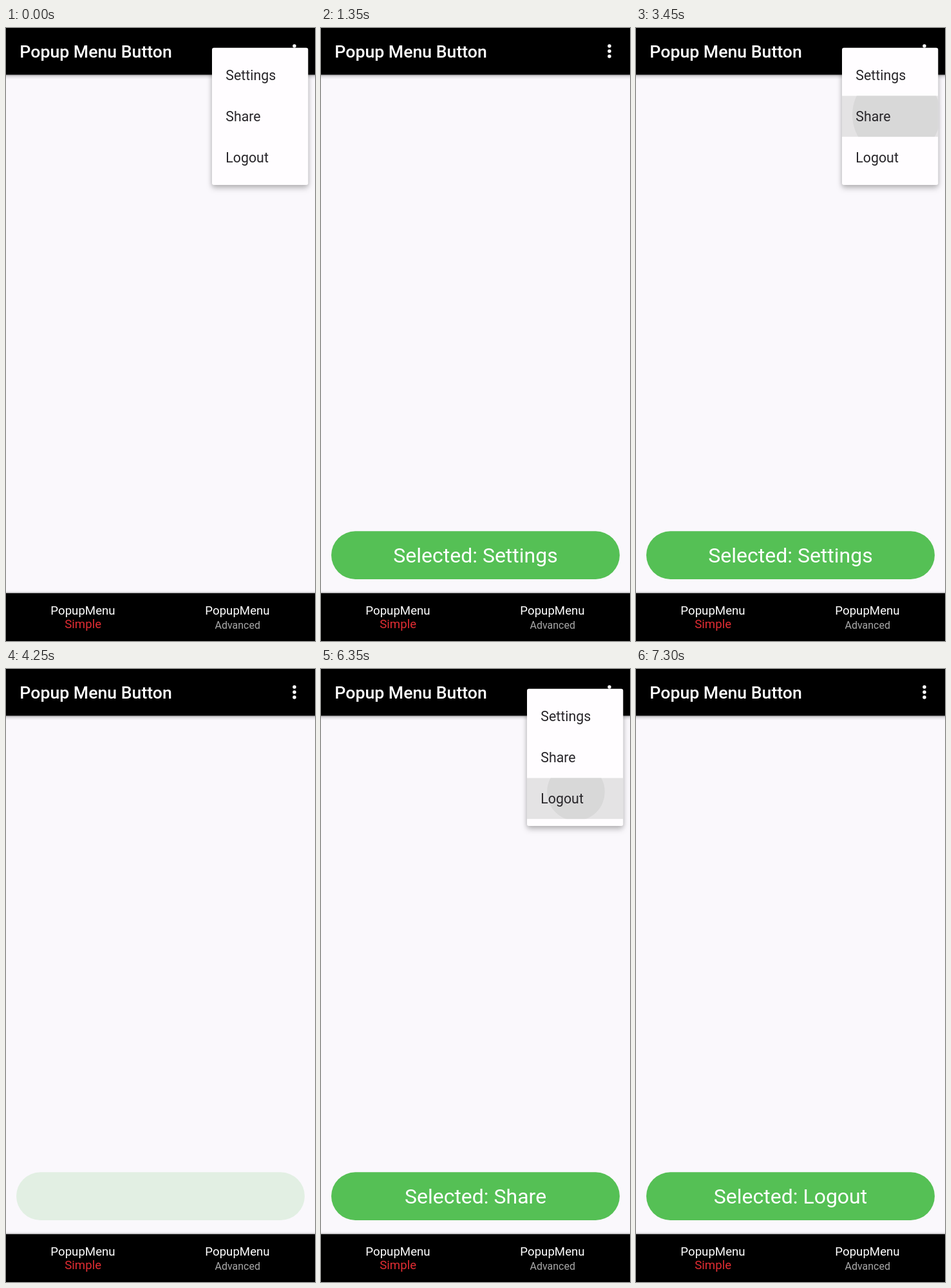
An HTML page for the animation above (8 s loop, 480 by 953 pixels).

```html
<!DOCTYPE html>
<html lang="en">
<head>
<meta charset="utf-8">
<title>Popup Menu Button</title>
<style>
  html, body { margin: 0; width: 100%; height: 100%; overflow: hidden; background: #faf8fc; }
  svg { display: block; width: 100%; height: 100%; }
  text { font-family: Roboto, sans-serif; }
  #menu { filter: drop-shadow(0 5px 5px rgba(0,0,0,.2)) drop-shadow(0 1px 3px rgba(0,0,0,.16)); }
  #items text { font-size: 21.333px; fill: #28262a; }
  #nav text { font-size: 18.667px; text-anchor: middle; fill: #fff; }
  #nav .simple { fill: #e32d33; }
  #nav .advanced { font-size: 16px; fill: #a8a8a8; }
  #label { font-size: 32px; text-anchor: middle; fill: #fff; }
</style>
</head>
<body>
<svg viewBox="0 0 480 953">
  <defs>
    <linearGradient id="under" x1="0" y1="0" x2="0" y2="1">
      <stop offset="0" stop-color="#000" stop-opacity=".32"/>
      <stop offset=".4" stop-color="#000" stop-opacity=".1"/>
      <stop offset="1" stop-color="#000" stop-opacity="0"/>
    </linearGradient>
    <linearGradient id="over" x1="0" y1="1" x2="0" y2="0">
      <stop offset="0" stop-color="#000" stop-opacity=".12"/>
      <stop offset="1" stop-color="#000" stop-opacity="0"/>
    </linearGradient>
    <clipPath id="barClip"><rect width="480" height="72.7"/></clipPath>
    <clipPath id="menuClip"><rect id="menuClipBox" rx="3"/></clipPath>
    <clipPath id="rowClip"><rect id="rowClipBox" x="320" width="149.33" height="64"/></clipPath>
  </defs>

  <rect width="480" height="953" fill="#faf8fc"/>
  <rect y="72.7" width="480" height="7" fill="url(#under)"/>
  <rect y="874.5" width="480" height="4" fill="url(#over)"/>

  <g id="snack">
    <rect x="16" y="782.3" width="448" height="74.6" rx="37.3" fill="#55c055"/>
    <text id="label" x="240" y="830.5"></text>
  </g>

  <g id="nav">
    <rect y="878.5" width="480" height="74.5"/>
    <text x="119.5" y="911.7">PopupMenu</text>
    <text class="simple" x="119.7" y="933.2">Simple</text>
    <text x="359.5" y="911.7">PopupMenu</text>
    <text class="advanced" x="359.7" y="934">Advanced</text>
  </g>

  <rect width="480" height="72.7"/>
  <g clip-path="url(#barClip)"><circle id="splash" fill="#fff"/></g>
  <text x="21.33" y="46" font-size="26.667" font-weight="500" fill="#fff">Popup Menu Button</text>
  <g fill="#fff">
    <circle cx="448" cy="28" r="2.75"/>
    <circle cx="448" cy="36" r="2.75"/>
    <circle cx="448" cy="44" r="2.75"/>
  </g>

  <g id="menu">
    <rect id="panel" rx="3" fill="#fffdff"/>
    <g clip-path="url(#menuClip)">
      <g id="ink" clip-path="url(#rowClip)">
        <rect id="glow" x="320" width="149.33" height="64" fill="#bcbcbc"/>
        <circle id="ripple" fill="#c5c5c5" fill-opacity=".4"/>
      </g>
      <g id="items"></g>
    </g>
  </g>

  <circle id="finger" cx="462" cy="30" r="8.5" fill="#aaa"/>
</svg>
<script>
const LOOP = 8000;
const MENU = { left: 320, right: 469.33, top: 30.67, w: 149.33, h: 213.33, row: 64, pad: 10.67 };
const NAMES = ['Settings', 'Share', 'Logout'];
// Per round: menu opens, row is pressed, ripple rests, menu closes, snackbar shows.
const ROUNDS = [
  { open: -400, press: 100,  rest: 900,  pop: 1140, dur: 200, show: 1190, x: 395,   y: 72 },
  { open: 2090, press: 2700, rest: 3450, pop: 3910, dur: 300, show: 4230, x: 404.5, y: 135 },
  { open: 5055, press: 5835, rest: 6350, pop: 6665, dur: 300, show: 6985, x: 396,   y: 191 }
];

const $ = id => document.getElementById(id);
const set = (el, attrs) => { for (const k in attrs) el.setAttribute(k, attrs[k]); };
const ramp = (v, a, b) => Math.min(1, Math.max(0, (v - a) / (b - a)));
const rowTop = i => MENU.top + MENU.pad + i * MENU.row;

const items = NAMES.map((name, i) => {
  const el = document.createElementNS('http://www.w3.org/2000/svg', 'text');
  el.textContent = name;
  set(el, { x: 341.33, y: rowTop(i) + 39.6 });
  return $('items').appendChild(el);
});

function drawMenu(t, r) {
  const v = t < r.pop ? ramp(t, r.open, r.open + 300)
                      : Math.min(1, (1 - ramp(t, r.pop, r.pop + r.dur)) * 1.5);
  const unit = 1 / (NAMES.length + 1.5);
  const w = MENU.w * ramp(v, 0, unit);
  const h = MENU.h * ramp(v, 0, unit * NAMES.length);
  const box = { x: MENU.right - w, y: MENU.top, width: w, height: h };
  set($('panel'), box);
  set($('menuClipBox'), box);
  set($('menu'), { opacity: ramp(v, 0, 1 / 3), visibility: v > 0 ? 'visible' : 'hidden' });
  items.forEach((el, i) => set(el, { opacity: ramp(v, (i + 1) * unit, (i + 2.5) * unit) }));
}

function drawInk(t, r, i) {
  const y = rowTop(i);
  const reach = Math.hypot(Math.max(r.x - MENU.left, MENU.right - r.x),
                           Math.max(r.y - y, y + MENU.row - r.y));
  const grown = reach * Math.max(0, Math.min(t, r.rest) - r.press) / 1000;
  const radius = Math.min(reach, grown + Math.max(0, t - r.pop - 30));
  set($('rowClipBox'), { y });
  set($('glow'), { y, 'fill-opacity': 0.4 * ramp(t, r.press, r.press + 200) });
  set($('ripple'), { cx: r.x, cy: r.y, r: radius });
  set($('ink'), { opacity: t < r.press ? 0 : 1 - ramp(t, r.pop + 30, r.pop + 230) });
}

function drawTap(t) {
  const tap = ROUNDS.slice(1).map(r => r.open - 160).filter(s => s <= t).pop();
  const age = tap === undefined ? 1e4 : t - tap;
  const k = ramp(age, 0, 155);
  set($('splash'), {
    cx: 462 - 7 * k, cy: 30 + 5 * k,
    r: 54 * (1 - (1 - k) ** 2) + 4 * ramp(age, 155, 300),
    opacity: 0.27 * ramp(age, 0, 60) * (1 - ramp(age, 190, 400))
  });
  set($('finger'), { opacity: 0.5 * (1 - ramp(age, 170, 220)) });
}

function drawSnack(t, r, i) {
  const shown = t >= r.show;
  const fade = shown ? ramp(t, r.show, r.show + 150)
                     : i ? 1 - ramp(t, r.pop + 15, r.pop + 165) : 0;
  $('label').textContent = 'Selected: ' + NAMES[shown ? i : Math.max(0, i - 1)];
  set($('snack'), { opacity: fade });
  set($('label'), { opacity: ramp(fade, 0.15, 0.5) });
}

function draw(t) {
  const i = ROUNDS.filter(r => r.open <= t).length - 1;
  const r = ROUNDS[i];
  drawMenu(t, r);
  drawInk(t, r, i);
  drawTap(t);
  drawSnack(t, r, i);
}

const start = performance.now();
function tick() {
  draw((performance.now() - start) % LOOP);
  requestAnimationFrame(tick);
}
tick();
</script>
</body>
</html>
```
